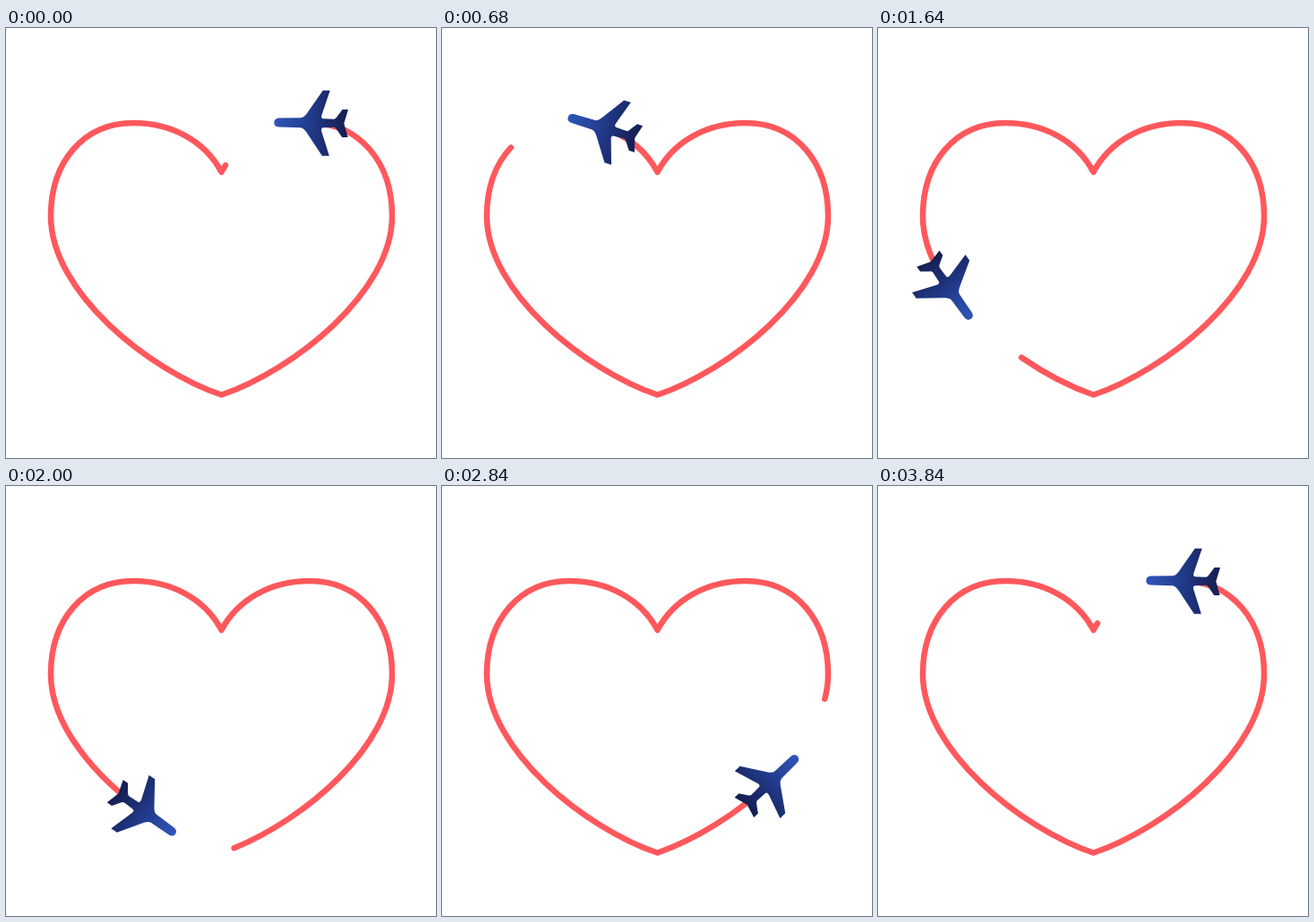
An HTML page for the animation above (3.88 s loop, 480 px wide and 480 px high).

```html
<!DOCTYPE html>
<html lang="en">
<head>
<meta charset="utf-8">
<title>Plane drawing a heart</title>
<style>
  html, body { margin: 0; width: 100%; height: 100%; overflow: hidden; background: #fff; }
  svg { display: block; width: 100%; height: 100%; }
</style>
</head>
<body>
<svg viewBox="0 0 480 480">
  <defs>
    <linearGradient id="paint" gradientUnits="userSpaceOnUse" x1="40" y1="0" x2="-40" y2="0">
      <stop offset="0" stop-color="#2f55b8"/>
      <stop offset=".45" stop-color="#223d8f"/>
      <stop offset=".7" stop-color="#1c2d70"/>
      <stop offset="1" stop-color="#151f52"/>
    </linearGradient>
  </defs>
  <path id="trail" fill="none" stroke="#ff585c" stroke-width="6.500" stroke-linecap="round" stroke-linejoin="round"
    d="M339 106C296 106 259 126 240.500 160.800C222 126 185 106 142 106C86 106 50 150 50 210
       C50 295 160 382 240.500 409.500C321 382 431 295 431 210C431 150 395 106 339 106Z"/>
  <!-- Nose points along +x, origin on the flight path -->
  <path id="plane" fill="url(#paint)"
    d="M36 -5Q41 -4.500 41 0Q41 4.500 36 5L11 5.500Q8 6 5 10L-13 36.500H-21L-12 9Q-11 5 -14 5L-26 4.500
       Q-28 5 -29 7L-35 15.500H-41.500L-37 0L-41.500 -15.500H-35L-29 -7Q-28 -5 -26 -4.500L-14 -5
       Q-11 -5 -12 -9L-21 -36.500H-13L5 -10Q8 -6 11 -5.500Z"/>
</svg>
<script>
  const LOOP = 3880, STEP = 40, LAP_STEPS = 96, GAP = 111, LAG = 1.3;
  const trail = document.getElementById('trail');
  const plane = document.getElementById('plane');
  const length = trail.getTotalLength();
  const pointAt = s => trail.getPointAtLength((s + length) % length);

  trail.setAttribute('stroke-dasharray', `${length - GAP} ${GAP}`);

  function draw(time) {
    const step = Math.floor((time % LOOP) / STEP);
    const s = (step % LAP_STEPS) / LAP_STEPS * length - LAG;
    const here = pointAt(s), back = pointAt(s - .5), ahead = pointAt(s + .5);
    const angle = Math.atan2(ahead.y - back.y, ahead.x - back.x) * 180 / Math.PI;
    plane.setAttribute('transform', `translate(${here.x} ${here.y}) rotate(${angle})`);
    trail.setAttribute('stroke-dashoffset', -(s + GAP));
  }

  const start = performance.now();
  function tick() {
    draw(performance.now() - start);
    requestAnimationFrame(tick);
  }
  tick();
</script>
</body>
</html>
```
